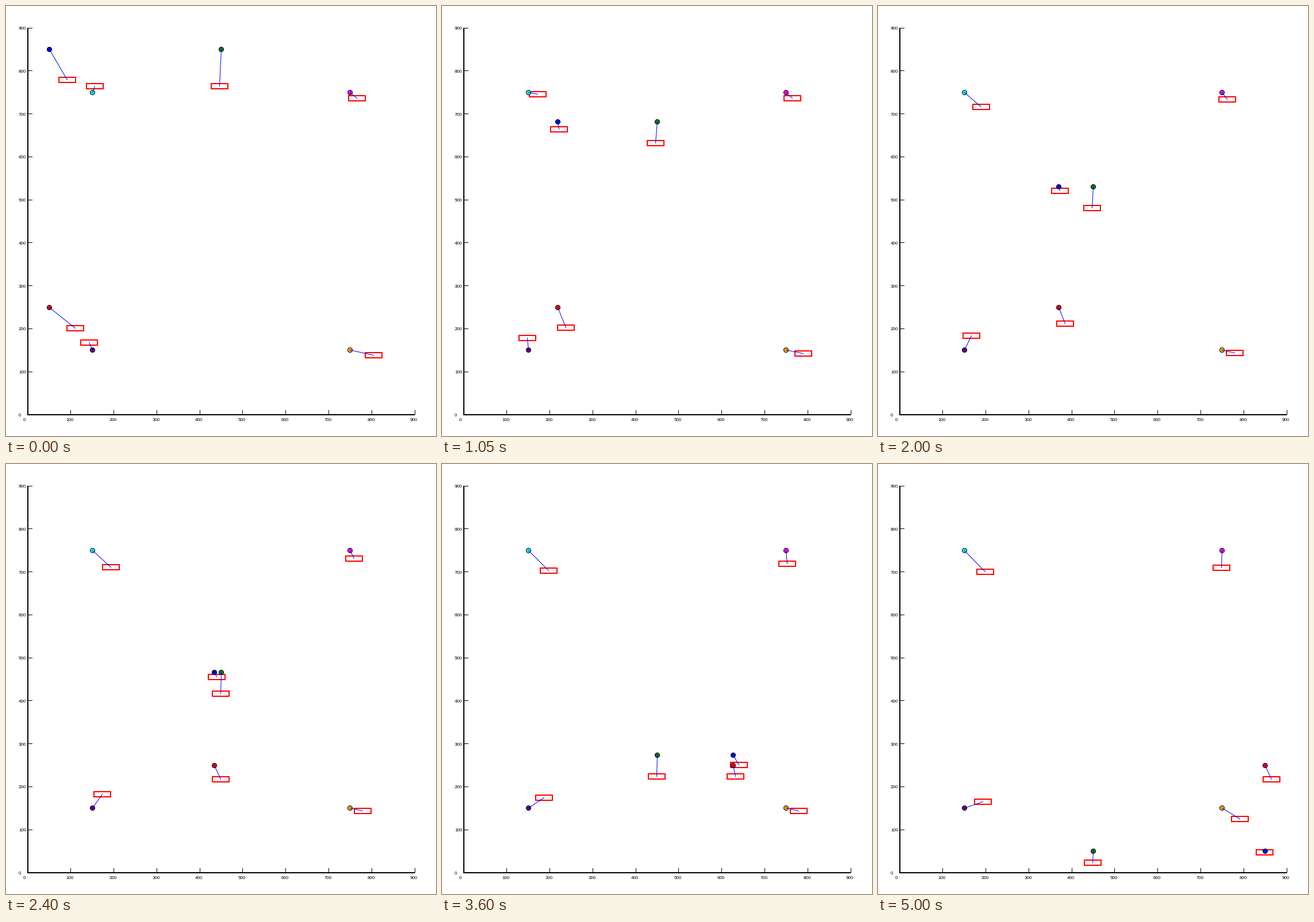
A matplotlib script that plays this animation: 748 by 748 pixels, repeating every 5.05 s.

```python
import numpy as np
import matplotlib.pyplot as plt
from matplotlib.animation import FuncAnimation
from matplotlib.patches import Circle, Rectangle

SIZE, DPI = 748, 88
PT = 72 / DPI            # one pixel in points
FRAMES, STEP_MS = 101, 50
LEFT, BOTTOM, SCALE = 38, 711, 673 / 900
BOX_W, BOX_H = 29, 9
STEP = np.arange(FRAMES)


def glide(start, end):
    """Ease from 0 to 1 between two frames."""
    s = np.clip((STEP - start) / (end - start), 0, 1)
    return s * s * (3 - 2 * s)


def settle(start, tau):
    """Relax from 0 towards 1, beginning at a frame."""
    return 1 - np.exp(-np.maximum(STEP - start, 0) / tau)


def to_px(x, y):
    return LEFT + x * SCALE, BOTTOM - y * SCALE


def mid(v):
    """Centre of the pixel that holds v."""
    return np.floor(v) + 0.5


class Marker:
    """A point, its empty label box and the link between them."""

    def __init__(self, color, start, speed, dx, dy):
        self.start, self.speed, self.dx, self.dy = start, speed, dx, dy
        self.box = Rectangle((0, 0), BOX_W, BOX_H, fill=False, ec="#ff0000",
                             lw=2 * PT, joinstyle="miter", zorder=2)
        self.dot = Circle((0, 0), 4, fc=color, ec="black", lw=PT, zorder=3)
        for patch in (self.box, self.dot):
            patch.set_snap(False)
            ax.add_patch(patch)
        self.link, = ax.plot([], [], color="#0000ff", lw=PT, snap=False,
                             zorder=5)

    def move(self, n):
        x, y = to_px(self.start[0] + self.speed[0] * n,
                     self.start[1] + self.speed[1] * n)
        lx, ly = x + self.dx[n], y + self.dy[n]
        self.box.set_xy((round(lx - BOX_W / 2), round(ly - BOX_H / 2)))
        self.dot.center = mid(x), mid(y)
        self.link.set_data([mid(x), mid(lx)], [mid(y), mid(ly)])
        return [self.box, self.dot, self.link]


def draw_axes():
    def line(xs, ys, width):
        ax.plot(xs, ys, color="black", lw=width * PT, snap=False,
                solid_capstyle="butt", zorder=1)

    def label(x, y, value):
        ax.text(x, y, str(value), fontsize=8 * PT, family="Liberation Sans",
                ha="left", va="baseline")

    line([LEFT, LEFT], [38, BOTTOM + 1], 2)
    line([LEFT - 1, 711], [BOTTOM, BOTTOM], 2)
    for value in range(0, 901, 100):
        x, y = to_px(value, value)
        line([mid(x), mid(x)], [703, BOTTOM], 1)
        line([LEFT, 46], [mid(y), mid(y)], 1)
        label(x - 8, 722, value)
        label(22, y + 3, value)


fig = plt.figure(figsize=(SIZE / DPI, SIZE / DPI), dpi=DPI, facecolor="white")
ax = fig.add_axes([0, 0, 1, 1])
ax.set_xlim(0, SIZE)
ax.set_ylim(SIZE, 0)
ax.axis("off")
ax.set_autoscale_on(False)
draw_axes()

# the purple label swings round its point while backing away
angle = np.radians(-22 + 114 * settle(12, 52))
reach = 14 + 21 * settle(8, 28)
approach = glide(-5, 40)
shove = glide(88, 100)

markers = [
    Marker("#ff0000", (50, 250), (8, 0),
           45.4 - 35 * settle(0, 10) - 6.5 * (glide(50, 70) - glide(72, 86)),
           36.5 - 17 * glide(10, 70) + 4.5 * shove),
    Marker("#0000ff", (50, 850), (8, -8),
           31.1 - 31 * settle(0, 7.5) + 10 * glide(30, 72)
           - 11.6 * glide(80, 100),
           52.9 - 48 * settle(0, 12) + 12 * glide(40, 72) - 15 * shove),
    Marker("#008000", (450, 850), (0, -8),
           -3.2 + 2 * glide(10, 60),
           64.1 - 27 * settle(0, 5) - 17.5 * glide(72, 104)),
    Marker("#ff00ff", (750, 750), (0, 0),
           11.7 - 13.5 * glide(10, 100), 10.2 + 20 * glide(26, 100)),
    Marker("#00ffff", (150, 750), (0, 0),
           4.4 + 32.5 * settle(13, 18), -11 + 49.5 * settle(14, 20)),
    Marker("#6a008c", (150, 150), (0, 0),
           reach * np.sin(angle), -reach * np.cos(angle)),
    Marker("#ffa500", (750, 150), (0, 0),
           41.2 - 19.5 * approach + 9 * shove,
           8.5 - 4.1 * approach + 14.3 * shove),
]


def update(n):
    return [artist for marker in markers for artist in marker.move(n)]


anim = FuncAnimation(fig, update, frames=FRAMES, interval=STEP_MS,
                     repeat=True, repeat_delay=0, blit=False)
plt.show()
```
